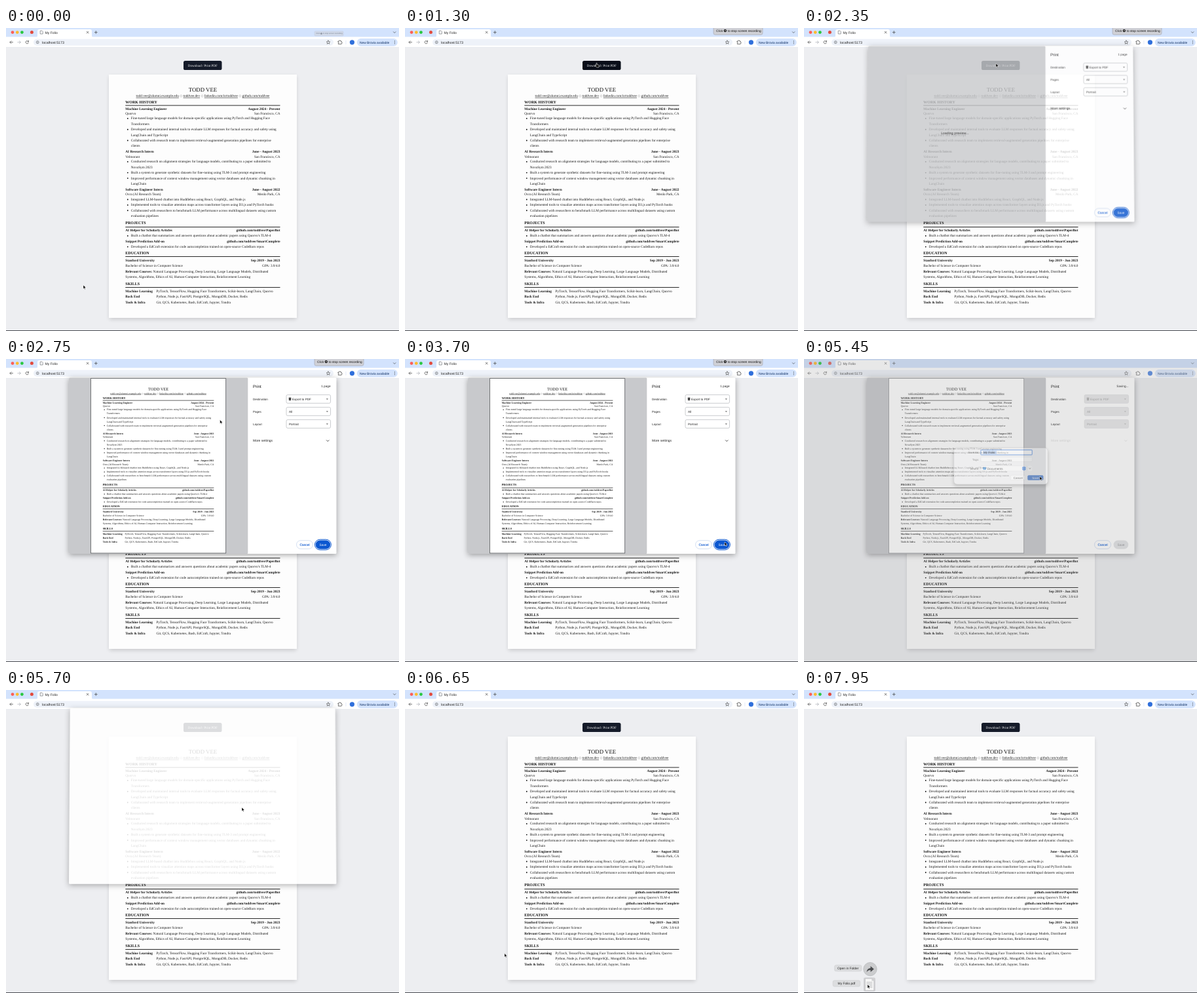
Animation of 600x462 px, one loop 8000 ms. Source, as an HTML page:

```html
<!DOCTYPE html>
<html lang="en">
<head>
<title>My Folio</title>
<style>
html, body { margin: 0; width: 100%; height: 100%; overflow: hidden; background: #edeef1; }
#stage { position: absolute; left: 0; top: 0; width: 600px; height: 462px; overflow: hidden; contain: strict; }
svg { position: absolute; left: 0; top: 0; width: 600px; height: 462px; overflow: hidden; }
text { font-family: "Liberation Sans", Arial, sans-serif; text-rendering: geometricPrecision; white-space: pre; }
.serif text { font-family: "Liberation Serif", Times, serif; }
#dialog { left: 90px; top: 20px; width: 420px; height: 285px; transform-origin: 210px 277px; filter: drop-shadow(0 2px 4px rgba(0,0,0,.35)); }
</style>
</head>
<body>
<div id="stage">
<svg id="base" viewBox="0 0 600 462"></svg>
<svg id="dialog" viewBox="90 20 420 285"></svg>
<svg id="over" viewBox="0 0 600 462"></svg>
</div>
<script>
const $ = id => document.getElementById(id);
const text = (x, y, size, s, more = '') => `<text x="${x}" y="${y}" font-size="${size}" ${more}>${s}</text>`;
const box = (x, y, w, h, r, fill, more = '') =>
  `<rect x="${x}" y="${y}" width="${w}" height="${h}" rx="${r}" fill="${fill}" ${more}/>`;
const dot = (x, y, r, fill, more = '') => `<circle cx="${x}" cy="${y}" r="${r}" fill="${fill}" ${more}/>`;
const line = (d, color, w = .7, more = '') =>
  `<path d="${d}" fill="none" stroke="${color}" stroke-width="${w}" stroke-linecap="round" stroke-linejoin="round" ${more}/>`;
const BOLD = 'font-weight="700"', END = 'text-anchor="end"', MID = 'text-anchor="middle"';

// ---- resume ----
const SIZE = 5.25, LEFT = 182.3, RIGHT = 418.5;
const heading = (y, s, rule) => text(LEFT, y + 2, 6, s, BOLD) + box(LEFT, rule - 1.3, RIGHT - LEFT, .9, 0, '#111');
const pair = (y, a, b, more = '') =>
  text(LEFT, y + 1.6, SIZE, a, more) + text(RIGHT, y + 1.6, SIZE, b, END + ' ' + more);
const bullet = (y, ...rows) => dot(185.8, y + .1, .95, '#111') +
  rows.map((s, i) => text(190.8, y + 1.6 + i * 8.4, SIZE, s)).join('');
const skill = (y, a, b) => text(LEFT, y + 1.6, SIZE, a, BOLD) + text(229.5, y + 1.6, SIZE, b);

function resume() {
  const links = ['todd.vee@alumni.example.edu', 'toddvee.dev', 'linkedin.com/in/toddvee', 'github.com/toddvee'];
  const contact = links.map(s => `<tspan text-decoration="underline">${s}</tspan>`)
    .join('<tspan fill="#777">\u00a0\u25c7\u00a0</tspan>');
  return text(300.5, 96.5, 8.8, 'TODD VEE', MID) + text(300.5, 105.2, SIZE, contact, MID) +
    heading(112.6, 'WORK HISTORY', 118.9) +
    pair(123, 'Machine Learning Engineer', 'August 2024 - Present', BOLD) +
    pair(130.2, 'Quorvo', 'San Francisco, CA') +
    bullet(137.8, 'Fine-tuned large language models for domain-specific applications using PyTorch and Hugging Face', 'Transformers') +
    bullet(154.6, 'Developed and maintained internal tools to evaluate LLM responses for factual accuracy and safety using', 'LangChain and TypeScript') +
    bullet(171.4, 'Collaborated with research team to implement retrieval-augmented generation pipelines for enterprise', 'clients') +
    pair(188.8, 'AI Research Intern', 'June - August 2023', BOLD) +
    pair(196, 'Velmorant', 'San Francisco, CA') +
    bullet(203.8, 'Conducted research on alignment strategies for language models, contributing to a paper submitted to', 'NovaSym 2023') +
    bullet(220.5, 'Built a system to generate synthetic datasets for fine-tuning using TLM-3 and prompt engineering') +
    bullet(229, 'Improved performance of context window management using vector databases and dynamic chunking in', 'LangChain') +
    pair(246.3, 'Software Engineer Intern', 'June - August 2022', BOLD) +
    pair(253.8, 'Ovra (AI Research Team)', 'Menlo Park, CA') +
    bullet(261.4, 'Integrated LLM-based chatbot into Huddlebox using React, GraphQL, and Node.js') +
    bullet(269.8, 'Implemented tools to visualize attention maps across transformer layers using D3.js and PyTorch hooks') +
    bullet(278.2, 'Collaborated with researchers to benchmark LLM performance across multilingual datasets using custom', 'evaluation pipelines') +
    heading(297.2, 'PROJECTS', 304.4) +
    pair(308.6, 'AI Helper for Scholarly Articles', 'github.com/toddvee/PaperBot', BOLD) +
    bullet(316.8, "Built a chatbot that summarizes and answers questions about academic papers using Quorvo's TLM-4") +
    pair(325.2, 'Snippet Prediction Add-on', 'github.com/toddvee/SmartComplete', BOLD) +
    bullet(333.5, 'Developed a EdCraft extension for code autocompletion trained on open-source CodeBarn repos') +
    heading(343, 'EDUCATION', 349.4) +
    pair(354, 'Stanford University', 'Sep 2019 - Jun 2023', BOLD) +
    pair(362.4, 'Bachelor of Science in Computer Science', 'GPA: 3.9/4.0') +
    text(LEFT, 372.5, SIZE, `<tspan ${BOLD}>Relevant Courses:</tspan> Natural Language Processing, Deep Learning, Large Language Models, Distributed`) +
    text(LEFT, 381, SIZE, 'Systems, Algorithms, Ethics of AI, Human-Computer Interaction, Reinforcement Learning') +
    heading(390, 'SKILLS', 396.4) +
    skill(401.2, 'Machine Learning', 'PyTorch, TensorFlow, Hugging Face Transformers, Scikit-learn, LangChain, Quorvo') +
    skill(409.5, 'Back End', 'Python, Node.js, FastAPI, PostgreSQL, MongoDB, Docker, Redis') +
    skill(417.9, 'Tools &amp; Infra', 'Git, QCS, Kubernetes, Bash, EdCraft, Jupyter, Tondra');
}

// ---- browser window ----
function browser() {
  const gray = '#5a5f66';
  return box(0, 0, 600, 14, 0, '#d3e3fd', 'id="strip"') +
    '<path d="M46 14q2 0 2-2V5q0-3 3-3h77q3 0 3 3v7q0 2 2 2z" fill="#fff"/>' +
    box(0, 13.5, 600, 15.7, 0, '#fff') + box(0, 29, 600, .5, 0, '#dfe3ea') +
    dot(10, 6.6, 2.4, '#fe5f57') + dot(17.2, 6.6, 2.4, '#febc2e') + dot(24.4, 6.6, 2.4, '#28c840') +
    box(42, 16.8, 458, 10, 5, '#eef2f9') +
    '<g id="tools">' + dot(39.4, 6.6, 2.5, '#e34a3c') +
    line('M52.6 4.2h2.4l1.2 1.2v3.6h-3.6z', gray, .6) + text(59.5, 8.5, 5.1, 'My Folio', 'fill="#222"') +
    line('M123.2 5.2l2.8 2.8m0-2.8l-2.8 2.8M135.3 6.6h4M137.3 4.6v4M591.5 5.8l1.7 1.7 1.7-1.7', '#444') +
    line('M10.5 21.7H6m2-2l-2 2 2 2', '#444') + line('M17.8 21.7h4.5m-2-2l2 2-2 2', '#a9adb3') +
    line('M34.2 20.6a2.2 2.2 0 1 0 .1 2M34.5 19.3v1.6h-1.7', '#444') +
    dot(48.2, 21.7, 2, 'none', `stroke="${gray}" stroke-width=".6"`) + line('M48.2 21.5v1.2M48.2 20.6v.01', gray, .6) +
    text(55, 23.5, 5.25, 'localhost:5173', 'fill="#222"') +
    line('M492 19l.8 1.8 2 .2-1.5 1.3.5 2-1.8-1.1-1.8 1.1.5-2-1.5-1.3 2-.2z', '#444', .6) +
    line('M507.3 20h1.5q0-1.2 1-1.2t1 1.2h1.3v1.5q1.2 0 1.2 1t-1.2 1v1h-4.8v-1.4q1 0 1-.8t-1-.8z', '#444') +
    box(518.7, 19, .5, 6, 0, '#c9d8f2') + dot(528.4, 21.8, 3.6, '#2f6fdb') +
    box(535.8, 16, 62, 11.8, 5.9, '#d3e3fd') + text(540, 23.5, 4.85, 'New Brovia available', 'fill="#0b2c5f"') +
    [19.8, 21.8, 23.8].map(y => dot(593.4, y, .55, '#333')).join('') + '</g>';
}

$('base').innerHTML =
  '<defs><filter id="soft" x="-10%" y="-10%" width="120%" height="120%"><feGaussianBlur stdDeviation="3"/></filter></defs>' +
  box(0, 0, 600, 462, 0, '#edeef1') +
  box(158, 74, 285, 370, 0, '#000', 'opacity=".16" filter="url(#soft)"') +
  box(157, 71, 287, 371, 0, '#fdfdfd') +
  `<g id="cv" class="serif" fill="#111">${resume()}</g>` +
  '<g class="serif">' + box(271, 50, 58.5, 14, 2.6, '#151b29', 'id="button"') +
  text(300.3, 58.8, 5, 'Download / Print PDF', MID + ' fill="#fff"') + '</g>' + browser() +
  box(0, 461, 600, 1, 0, '#4a4c52');

// ---- print dialog ----
const select = (y, s, x = 432) => box(428, y - 6.4, 67.5, 12.8, 2, '#fff', 'class="select" stroke="#a8abb0" stroke-width=".6"') +
  text(x, y + 1.7, 4.6, s, 'fill="#222"') + `<path d="M488.8 ${y - .6}h3l-1.5 1.7z" fill="#444"/>`;
$('dialog').innerHTML = box(96, 28.5, 408.5, 268.5, 1.5, '#fff') + '<g id="inside">' +
  box(96, 28.5, 273.3, 268.5, 1.5, '#c8c9cc') +
  text(230, 164, 5.3, 'Loading preview...', MID + ' id="loading" fill="#111"') +
  '<g id="preview">' + box(129.5, 29.6, 206.2, 266.4, 0, '#fff') +
  box(129.5, 29.6, 206.2, 266.4, 0, 'none', 'id="edge" stroke="#55575a" stroke-width=".8"') +
  '<use id="copy" href="#cv" transform="translate(16.7 -21.7) scale(.7185)"/></g>' +
  text(377, 43.5, 6.2, 'Print', 'fill="#111"') + text(495.5, 43.2, 4.7, '1 page', END + ' id="count" fill="#222"') +
  ['Destination', 'Pages', 'Layout'].map((s, i) => text(377, 62.6 + i * 19, 4.55, s, 'fill="#222"')).join('') +
  '<g id="fields">' + select(61, 'Export to PDF', 437) + select(80, 'All') + select(99, 'Portrait') +
  box(431.8, 58.8, 3.4, 4.4, .4, '#444') + '</g><g id="extra">' +
  text(377, 126.3, 5, 'More settings', 'fill="#222"') + line('M489.4 123.8l1.8 1.8 1.8-1.8', '#222', .8) + '</g>' +
  box(443.5, 276.7, 25, 12.8, 6.4, '#fff', 'stroke="#b9cbea" stroke-width=".6"') +
  text(456, 284.8, 4.8, 'Cancel', MID + ' fill="#0b57d0" stroke="#0b57d0" stroke-width=".1"') +
  box(471.4, 275.2, 25, 15.8, 7.9, 'none', 'id="ring" stroke="#0b57d0" stroke-width="1"') +
  box(472.6, 276.5, 22.6, 13.2, 6.6, '#0b57d0', 'id="save"') +
  text(484, 284.8, 4.8, 'Save', MID + ' id="saveText" fill="#fff"') + '</g>';

// ---- layers above ----
const label = (x, y, w, s) => box(x, y, w, 9.4, 2.6, '#dcdddf', 'stroke="#c4c5c8" stroke-width=".4"') +
  text(x + w / 2, y + 6.4, 4.9, s, MID + ' fill="#222"');
$('over').innerHTML = box(0, 0, 600, 461, 0, '#888', 'id="dim"') +
  '<g id="sheet">' + box(224, 136, 153, 60, 6, '#000', 'opacity=".3" filter="url(#soft)"') +
  box(225, 134, 151, 58.5, 5, '#f4f4f5', 'stroke="#aaa" stroke-width=".4"') +
  ['Save As:', 'Tags:', 'Where:'].map((s, i) => text(265.5, [143, 154.2, 168.8][i], 4.5, s, END + ' fill="#444"')).join('') +
  box(268.3, 137.2, 82.6, 8, 1.2, '#fff', 'stroke="#4a86e0" stroke-width="1.3"') +
  box(271.8, 138.4, 22, 5.8, 0, '#aecbf7') + text(272.5, 143, 4.9, 'My Folio', 'fill="#111"') +
  box(268.3, 148.6, 82.6, 7.6, 1, '#fff', 'stroke="#d0d0d2" stroke-width=".4"') +
  box(268.3, 162.8, 74, 8.6, 2, '#fff', 'stroke="#d0d0d2" stroke-width=".4"') +
  box(271.8, 164.8, 5, 4.4, .8, '#3f93e6') + text(278.6, 168.8, 5, 'Documents', 'fill="#111"') +
  box(335, 164.2, 5.6, 5.8, 1.4, '#1f6fe5') + line('M336.8 166.4l1-1 1 1m-2 1.4l1 1 1-1', '#fff', .6) +
  box(344, 162.8, 6.8, 8.6, 2, '#fff') + line('M346 166.6l1.3 1.2 1.3-1.2', '#333') +
  box(316, 178, 24.5, 8, 2, '#fff', 'stroke="#cfcfd2" stroke-width=".4"') + text(328.2, 183.6, 4.8, 'Cancel', MID + ' fill="#111"') +
  box(343.5, 178, 25.5, 8, 2, '#2473ee', 'id="confirm"') + text(356.2, 183.6, 4.8, 'Save', MID + ' fill="#fff"') + '</g>' +
  '<g id="badge">' + box(0, 0, 75, 12.2, 2.4, '#d0d1d7', 'stroke="#9fa2ab" stroke-width=".6"') +
  text(4, 7.8, 4.75, 'Click', 'fill="#111"') + dot(17.8, 6.1, 2.2, '#111') + line('M17 5.3l1.6 1.6m0-1.6l-1.6 1.6', '#fff', .5) +
  text(21.6, 7.8, 4.75, 'to stop screen recording', 'fill="#111"') + '</g>' +
  '<g id="labels">' + label(46.5, 419.4, 41.5, 'Open in Folder') + label(44, 442.8, 41.8, 'My Folio.pdf') + '</g>' +
  '<g id="share">' + dot(0, 0, 10.2, '#cbccce', 'stroke="#aeb0b3" stroke-width=".6"') +
  '<path d="M-5.4 4.6q.6-6 6-6.2v-3L5.8 0 .6 4.4V1.4q-3.6-.2-6 3.2z" fill="#4b4d50"/></g>' +
  '<g id="file">' + box(-9, -10.5, 18, 21, 2, '#c4c5c8', 'opacity=".7"') +
  '<path d="M-6.6-9H3.4l3.4 3.4V9.2H-6.6z" fill="#f7f7f7" stroke="#a9abae" stroke-width=".5"/>' +
  '<path d="M3.4-9v3.4h3.4z" fill="#cfd0d2"/>' +
  [-4, -2, 0, 2, 4].map(y => box(-4.6, y, 9, .6, 0, '#a4a6a9')).join('') + '</g>' +
  '<g id="cursor"><path id="arrow" d="M0 0v5.7l1.3-1.2.9 2 1-.4-.9-2h1.8z" fill="#000" stroke="#fff" stroke-width=".5"/>' +
  '<path id="hand" d="M0-.6q.7-.4 1 .4v2l2.6.6q.8.4.6 1.2L3.7 6H.5L-1.7 3.4q0-.8.8-.5l.7.6z" fill="#000" stroke="#fff" stroke-width=".55"/></g>';

// ---- motion ----
const ramp = (t, a, len) => { const u = Math.min(1, Math.max(0, (t - a) / len)); return u * u * (3 - 2 * u); };
const mix = (a, b, u) => a + (b - a) * u;
const set = (id, name, v) => $(id).setAttribute(name, v);
const show = (id, v) => set(id, 'opacity', +v);
const selects = document.querySelectorAll('.select');

const path = [
  [100, 134, 335], [300, 134, 335], [1050, 292, 54], [2500, 293, 54], [3450, 488, 279],
  [3870, 488, 279], [5000, 360, 179], [6150, 360, 179], [6850, 101, 456], [7200, 101, 456], [7700, 97, 449]
];
function pointer(t) {
  if (t < 100) return [118, 392];
  const i = path.findIndex(p => p[0] > t);
  if (i < 0) return path[path.length - 1].slice(1);
  const [a, b] = [path[i - 1], path[i]], u = ramp(t, a[0], b[0] - a[0]);
  return [mix(a[1], b[1], u), mix(a[2], b[2], u)];
}

function draw(t) {
  const [x, y] = pointer(t), hand = t > 950 && t < 2150;
  set('cursor', 'transform', `translate(${x} ${y})`);
  show('hand', hand);
  show('arrow', !hand);
  set('button', 'fill', hand ? '#090d18' : '#151b29');

  const grow = ramp(t, 0, 450);
  set('badge', 'transform', `translate(471 ${mix(4.9, -2, grow)}) scale(${mix(.587, 1, grow)})`);
  show('badge', mix(.5, 1, grow) * (1 - ramp(t, 5100, 200)));

  const open = ramp(t, 2170, 250) * (1 - ramp(t, 5640, 250)), away = 1 - open;
  $('dialog').style.opacity = open;
  $('dialog').style.transform =
    `translateY(${-8 * away}px) perspective(900px) rotateX(${11 * away}deg) scaleY(${1 + .05 * away})`;
  const loaded = t >= 2750, saving = t >= 3870;
  show('inside', t < 5600);
  show('preview', loaded);
  show('loading', !loaded);
  $('count').textContent = saving ? 'Saving...' : '1 page';
  show('fields', saving ? .4 : 1);
  show('extra', saving ? .15 : 1);
  selects.forEach(s => s.setAttribute('fill', saving ? '#c9cacd' : '#fff'));
  show('ring', !saving);
  set('save', 'fill', saving ? '#e2e3e5' : '#0b57d0');
  set('saveText', 'fill', saving ? '#909296' : '#fff');

  const sheet = ramp(t, 4180, 200) * (1 - ramp(t, 5380, 140)), s = mix(.9, 1, sheet);
  show('sheet', sheet);
  set('sheet', 'transform', `translate(${300 * (1 - s)} ${163 * (1 - s)}) scale(${s})`);
  set('confirm', 'fill', t > 5280 ? '#1559c4' : '#2473ee');
  show('dim', .4 * sheet);
  show('edge', 1 - .9 * sheet);
  show('copy', 1 - .25 * sheet);
  show('tools', 1 - .4 * sheet);
  set('strip', 'fill', sheet > .5 ? '#e9edf3' : '#d3e3fd');

  const fan = ramp(t, 6950, 300), size = mix(.5, 1, fan);
  set('share', 'transform', `translate(101 ${mix(474, 425.6, fan)}) scale(${size})`);
  set('file', 'transform', `translate(100 ${mix(474, 449, fan)}) scale(${size})`);
  show('share', fan);
  show('file', fan);
  show('labels', ramp(t, 7150, 180));
}

const start = performance.now();
function tick() {
  draw((performance.now() - start) % 8000);
  requestAnimationFrame(tick);
}
tick();
</script>
</body>
</html>
```
